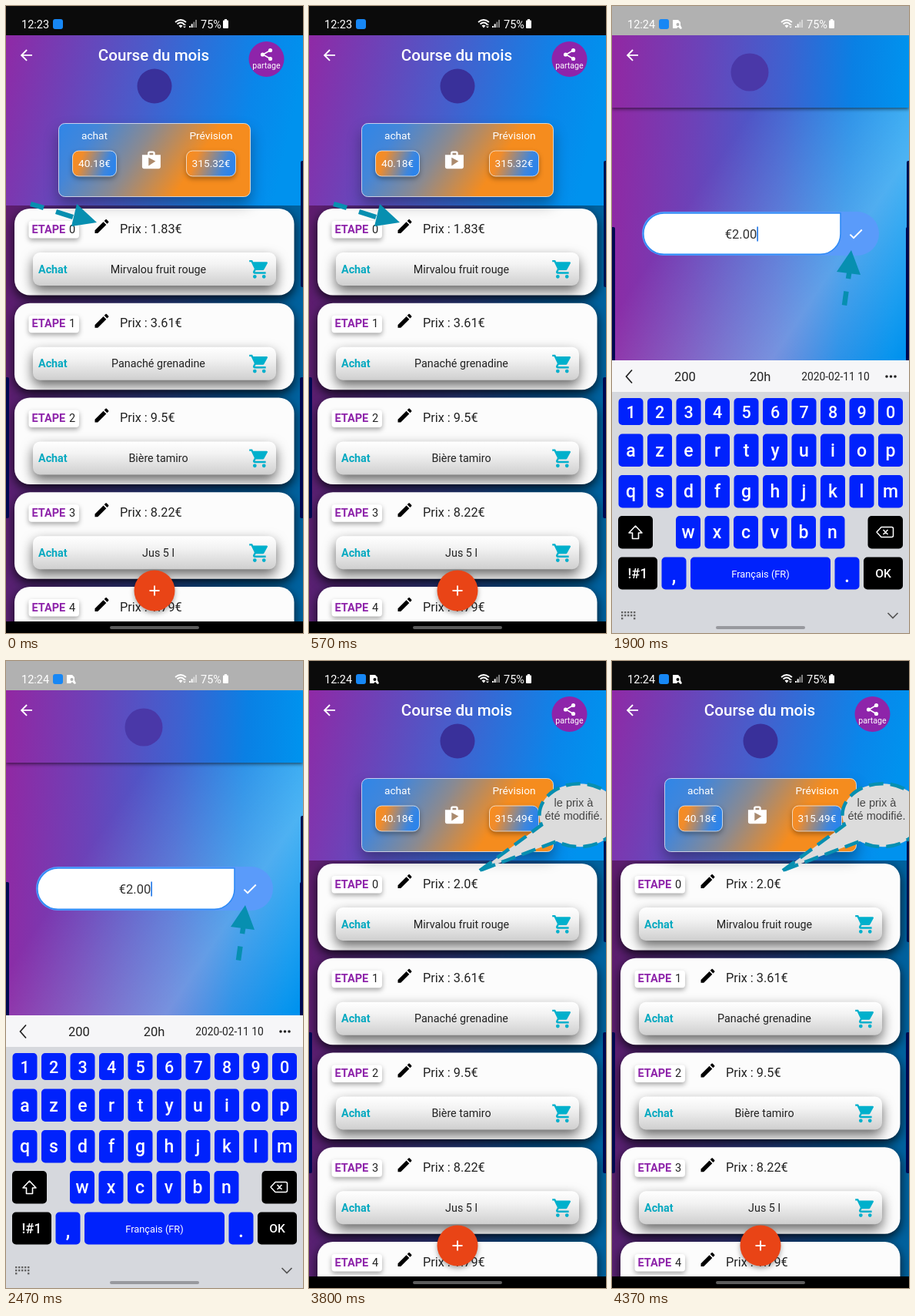
Animation of 386 by 814 pixels, one loop 4750 ms. Source, as an HTML page:

```html
<!DOCTYPE html>
<html lang="fr">
<head>
<meta charset="utf-8">
<style>
html, body { margin: 0; width: 100%; height: 100%; overflow: hidden; background: #000; }
svg { display: block; font-family: Roboto, sans-serif; }
.card { filter: drop-shadow(0 5px 7px #000c); }
.panel { filter: drop-shadow(0 7px 8px #0009); }
.chip { filter: drop-shadow(0 3px 3px #0005); }
.box { filter: drop-shadow(0 10px 9px #0005); }
.bar { filter: drop-shadow(0 2px 2px #0008); }
</style>
</head>
<body>
<svg id="stage" width="386" height="814" viewBox="0 0 386 814"></svg>
<script>
const STEP = 950;
const TEAL = '#078fb0';
const ICONS = {
  edit: 'M3 17.25V21h3.75L17.81 9.94l-3.75-3.75zM20.71 7.04c.39-.39.39-1.02 0-1.41l-2.34-2.34c-.39-.39-1.02-.39-1.41 0l-1.83 1.83 3.75 3.75z',
  cart: 'M7 18a2 2 0 1 0 0 4 2 2 0 0 0 0-4zM1 2v2h2l3.6 7.59-1.35 2.45C4.5 15.4 5.5 17 7 17h12v-2H7.42c-.14 0-.25-.11-.25-.25l.03-.12.9-1.63h7.45c.75 0 1.41-.41 1.75-1.03l3.58-6.49A1 1 0 0 0 20 4H5.21l-.94-2zm16 16a2 2 0 1 0 0 4 2 2 0 0 0 0-4z',
  back: 'M20 11H7.83l5.59-5.59L12 4l-8 8 8 8 1.41-1.41L7.83 13H20z',
  shop: 'M16 6V4c0-1.11-.89-2-2-2h-4c-1.11 0-2 .89-2 2v2H2v13c0 1.11.89 2 2 2h16c1.11 0 2-.89 2-2V6zm-6-2h4v2h-4zM9 18V9l7.5 4z',
  check: 'M9 16.17 4.83 12l-1.42 1.41L9 19 21 7l-1.41-1.41z'
};

const rect = (x, y, w, h, fill, r = 0, extra = '') =>
  `<rect x="${x}" y="${y}" width="${w}" height="${h}" rx="${r}" fill="${fill}" ${extra}/>`;
const path = (d, fill, extra = '') => `<path d="${d}" fill="${fill}" ${extra}/>`;
const line = (d, color, width = 1.5, extra = '') =>
  path(d, 'none', `stroke="${color}" stroke-width="${width}" ${extra}`);
const circle = (x, y, r, fill) => `<circle cx="${x}" cy="${y}" r="${r}" fill="${fill}"/>`;
const text = (x, y, size, fill, str, anchor = 'start', extra = '') =>
  `<text x="${x}" y="${y}" font-size="${size}" fill="${fill}" text-anchor="${anchor}" ${extra}>${str}</text>`;
const mid = (x, y, size, fill, str, extra) => text(x, y, size, fill, str, 'middle', extra);
const icon = (name, x, y, scale, fill) =>
  path(ICONS[name], fill, `transform="translate(${x} ${y}) scale(${scale})"`);
const gradient = (id, x2, y2, stops, units = 'userSpaceOnUse') =>
  `<linearGradient id="${id}" gradientUnits="${units}" x1="0" y1="0" x2="${x2}" y2="${y2}">` +
  stops.map(([at, color]) => `<stop offset="${at}" stop-color="${color}"/>`).join('') +
  '</linearGradient>';
const shine = peak => [[peak - .35, '#fff0'], [peak, '#ffffff4d'], [peak + .24, '#fff0']];

const defs = '<defs>' +
  gradient('sky', 386, 20, [[0, '#9327a2'], [.3, '#6c42b8'], [.6, '#3d62d0'], [.82, '#0a80e4'], [1, '#0092ee']]) +
  gradient('head', 386, 90, [[0, '#9327a4'], [.5, '#485dcb'], [.85, '#0a86ea'], [1, '#0092ee']]) +
  gradient('total', 1, .25, [[0, '#2f86e8'], [.2, '#4486d8'], [.48, '#8b8a90'], [.8, '#f58c1e'], [1, '#f58c1e']], 'objectBoundingBox') +
  gradient('pill', 1, .2, [[0, '#fb8c1a'], [.25, '#f08c2c'], [.85, '#3f86dc'], [1, '#2d84ea']], 'objectBoundingBox') +
  gradient('panel', 0, 1, [[0, '#fff'], [.35, '#f3f3f3'], [1, '#cfcfcf']], 'objectBoundingBox') +
  gradient('shineTall', 632, 386, shine(.68)) +
  gradient('shineShort', 480, 324, shine(.74)) +
  '</defs>';

function status(time, bg, badge) {
  const bars = [0, 1, 2, 3].map(i =>
    rect(238 + i * 2.7, 26 - i * 2.7, 1.9, 2 + i * 2.7, '#fff', 0, i > 1 ? 'opacity=".5"' : '')).join('');
  return rect(0, 0, 386, 38, bg) + text(20, 28.5, 14.5, '#fff', time) +
    rect(61, 17, 13, 13, '#1787f5', 3) +
    (badge ? path('M79 18h7l3 3v4l2 4-2 1-3-3-2 2h-5z', '#fff') + circle(85.5, 24, 2, bg) : '') +
    line('M220 21q7-6 14 0M222.500 23.500q4.500-4 9 0', '#fff', 1.7) +
    path('M224.500 25.500q2.500-2 5 0l-2.500 3z', '#fff') +
    path('M230 25l2-2 2 2zm0 1.500h4l-2 2z', '#fff') + bars +
    text(253, 28.5, 14.5, '#fff', '75%') +
    rect(282, 18.500, 7, 10.500, '#fff', 1) + rect(284, 17, 3, 2, '#fff');
}

const navBar = () => rect(0, 799, 386, 15, '#000') + rect(135, 805, 116, 4, '#5c5c5c', 2);
const edges = y => rect(383, 201, 5, 164, '#00104f', 2) +
  rect(-3, y, 7, 183, '#000850', 2) + rect(382, y, 7, 183, '#000850', 2);
const arrow = (dashes, head) => line(dashes, TEAL, 6.5) + path(head, TEAL);

function card(i, price, item) {
  return `<g transform="translate(0 ${i * 122.75})">` +
    rect(11, 263, 363.500, 112.500, '#fcfcfc', 20, 'class="card"') +
    rect(29.500, 279, 65.500, 22.500, '#fff', 4, 'class="chip"') +
    text(33.500, 294.500, 14.5, '#8e24aa', 'ETAPE', 'start', 'font-weight="700"') +
    text(82, 294.500, 14.5, '#222', i) +
    icon('edit', 112.500, 274, 1, '#000') +
    text(148, 294.500, 16.3, '#222', `Prix : ${price}€`) +
    rect(35, 320, 316, 43, 'url(#panel)', 9, 'class="panel"') +
    text(42, 346.500, 14.3, '#06a9c0', 'Achat', 'start', 'font-weight="700"') +
    mid(198, 346.500, 14.3, '#222', item) +
    icon('cart', 315, 327.500, 1.19, '#00b0cc') + '</g>';
}

function listScreen(time, price, forecast, badge) {
  const items = [[price, 'Mirvalou fruit rouge'], ['3.61', 'Panaché grenadine'],
    ['9.5', 'Bière tamiro'], ['8.22', 'Jus 5 l'], ['1.79', '']];
  const amount = (x, w, label, labelX, value) => mid(labelX, 173, 13.7, '#fff', label) +
    rect(x, 188, w, 33, 'url(#pill)', 8, 'stroke="#ffffffb0" class="chip"') +
    mid(x + w / 2, 209, 13.7, '#fff', value + '€');
  return rect(0, 38, 386, 776, 'url(#sky)') + rect(0, 259, 386, 540, '#0005') +
    items.map(([p, name], i) => card(i, p, name)).join('') +
    rect(0, 38, 386, 221, 'url(#head)') + status(time, '#0b0b0b', badge) +
    icon('back', 15, 52.500, .95, '#fff') +
    mid(192, 71, 20.6, '#fff', 'Course du mois', 'font-weight="500"') +
    circle(193, 104, 22.500, '#39309a') +
    circle(338.500, 69, 23, '#8e24aa') +
    line('M343.500 57.500 334 63l9.500 5.500', '#fff', 1.6) +
    circle(343.500, 57.500, 2.6, '#fff') + circle(333.500, 63, 2.6, '#fff') + circle(343.500, 68.500, 2.6, '#fff') +
    mid(338.500, 81, 10.6, '#fff', 'partage') +
    rect(68.500, 152.500, 249, 95, 'url(#total)', 8, 'stroke="#ffffffb0" class="box"') +
    amount(86.500, 57, 'achat', 115, '40.18') + amount(234.500, 64, 'Prévision', 266.500, forecast) +
    icon('shop', 174.500, 186, 1.2, '#fff') + edges(482) +
    `<g class="chip">${circle(193, 759, 26.500, '#e94416')}</g>` +
    line('M186.500 759h13M193 752.500v13', '#fff', 1.9) + navBar();
}

function editHeader(bodyHeight, overlay) {
  return rect(0, 38, 386, bodyHeight, 'url(#sky)') +
    (overlay ? rect(0, 132, 386, bodyHeight - 94, `url(#${overlay})`) : '') +
    rect(0, 38, 386, 94, 'url(#sky)', 0, 'class="bar"') + status('12:24', '#b1b1b1', true) +
    icon('back', 15, 52.500, .95, '#fff') + circle(179, 86, 24.500, '#4a38a8');
}

function editScreen(value, x, color, overlay) {
  return editHeader(761, overlay) + rect(38, 437, 308, 57, '#2484f8', 28.500) +
    path('M88 439.500H319a26 26 0 0 1 0 52.500H114.500A26.500 26.500 0 0 1 88 465.500z', '#fcfcfc') +
    icon('edit', 56.500, 454.500, .97, '#fff') +
    mid(x, 471.500, 16.5, color, value) + edges(482) + navBar();
}

function keyboard() {
  const BLUE = '#0022fc', BLACK = '#000';
  const key = (x, y, w, h, label, fill = BLUE, size = 23, dy = 8) =>
    rect(x, y, w, h, fill, 5) + mid(x + w / 2, y + h / 2 + dy, size, '#fff', label, 'font-weight="500"');
  const row = (letters, x, y, h, size) =>
    [...letters].map((c, i) => key(x + i * 37.5, y, 32, h, c, BLUE, size)).join('');
  const dots = [0, 1, 2].map(r => [0, 1, 2, 3, 4].map(c =>
    r === 2 && c % 4 ? '' : rect(12 + c * 4, 786 + r * 4, 2.4, 2.4, '#666')).join('')).join('');
  return rect(0, 460, 386, 41, '#f6f6f8') + rect(0, 501, 386, 313, '#d6d8dd') +
    line('M26 472.500 18.500 481l7.500 8.500', '#222', 1.7) +
    mid(95, 487, 16.5, '#222', '200') + mid(192.500, 487, 16.5, '#222', '20h') +
    mid(290.500, 486, 13.8, '#222', '2020-02-11 10') +
    [357, 362.500, 368].map(x => circle(x, 481, 1.8, '#222')).join('') +
    row('1234567890', 8.500, 509, 35, 21.5) + row('azertyuiop', 8.500, 555.500, 42.500) +
    row('qsdfghjklm', 8.500, 609, 42.500) + row('wxcvbn', 83, 662, 42.500) +
    rect(8, 662, 45, 42.500, BLACK, 5) + rect(332.500, 662, 45.500, 42.500, BLACK, 5) +
    line('M30.500 675l8.500 9h-4.500v7.500h-8V684H22z', '#fff', 1.6, 'stroke-linejoin="round"') +
    line('M350 676.500h13.500q2 0 2 2v9q0 2-2 2H350l-6-6.500zM352.500 680l6 6m0-6-6 6', '#fff', 1.5, 'stroke-linejoin="round"') +
    key(8, 715.500, 51, 42, '!#1', BLACK, 18, 6.5) + key(64.500, 715.500, 32, 42, ',', BLUE, 25, 11) +
    rect(102, 715.500, 182, 42, BLUE, 5) + mid(193, 741.500, 12.8, '#fff', 'Français (FR)') +
    key(289.500, 715.500, 32, 42, '.', BLUE, 25, 11) + key(327, 715.500, 51, 42, 'OK', BLACK, 15.5, 5.5) +
    dots + line('M358.500 788l6.500 6.500 6.500-6.500', '#555', 1.7) + rect(135, 805, 116, 4, '#98999e', 2);
}

const typingScreen = () => editHeader(422, 'shineShort') +
  rect(39, 267, 308, 57, '#5a9bfa', 28.500) +
  path('M297 269H67.500a26.700 26.700 0 0 0 0 53.400H271A26.500 26.500 0 0 0 297 296z', '#fff', 'stroke="#2f8af5" stroke-width="1.6"') +
  icon('check', 305.500, 284.500, .95, '#fff') +
  mid(167.500, 301.500, 16.5, '#333', '€2.00') + rect(188.300, 286.500, 1.7, 19, '#2a7de8') +
  edges(287) + keyboard() +
  arrow('M308.500 345l-1.500 9M304.500 370.500l-2.500 18', 'M311 317 292 345l31 4z');

const bubble = () =>
  path('M222 272 302 213A52 41 0 1 1 322 234z', '#dcdcdc', `stroke="${TEAL}" stroke-width="4.500" stroke-dasharray="19 9"`) +
  ['le prix à', 'été modifié.'].map((s, i) =>
    mid(344, 188.500 + i * 17.500, 14.5, '#444', s, 'font-family="Liberation Sans, Arial, sans-serif"')).join('');

const scenes = [
  listScreen('12:23', '1.83', '315.32', false) +
    arrow('M32 257l17 5M65 267l22 7', 'M92 257l26 24-33 5z'),
  editScreen('1.83€', 217, '#8a8a8a') +
    arrow('M71 368v18.500M71 403v11', 'M56 413h30.500L71 442z'),
  typingScreen(),
  editScreen('€2.00', 215.500, '#444', 'shineTall'),
  listScreen('12:24', '2.0', '315.49', true) + bubble()
];

const stage = document.getElementById('stage');
stage.innerHTML = defs + scenes.map(s => `<g display="none">${s}</g>`).join('');
const groups = [...stage.children].slice(1);

function draw() {
  const current = Math.floor(performance.now() / STEP) % groups.length;
  groups.forEach((g, i) => g.setAttribute('display', i === current ? 'inline' : 'none'));
  requestAnimationFrame(draw);
}
draw();
</script>
</body>
</html>
```
